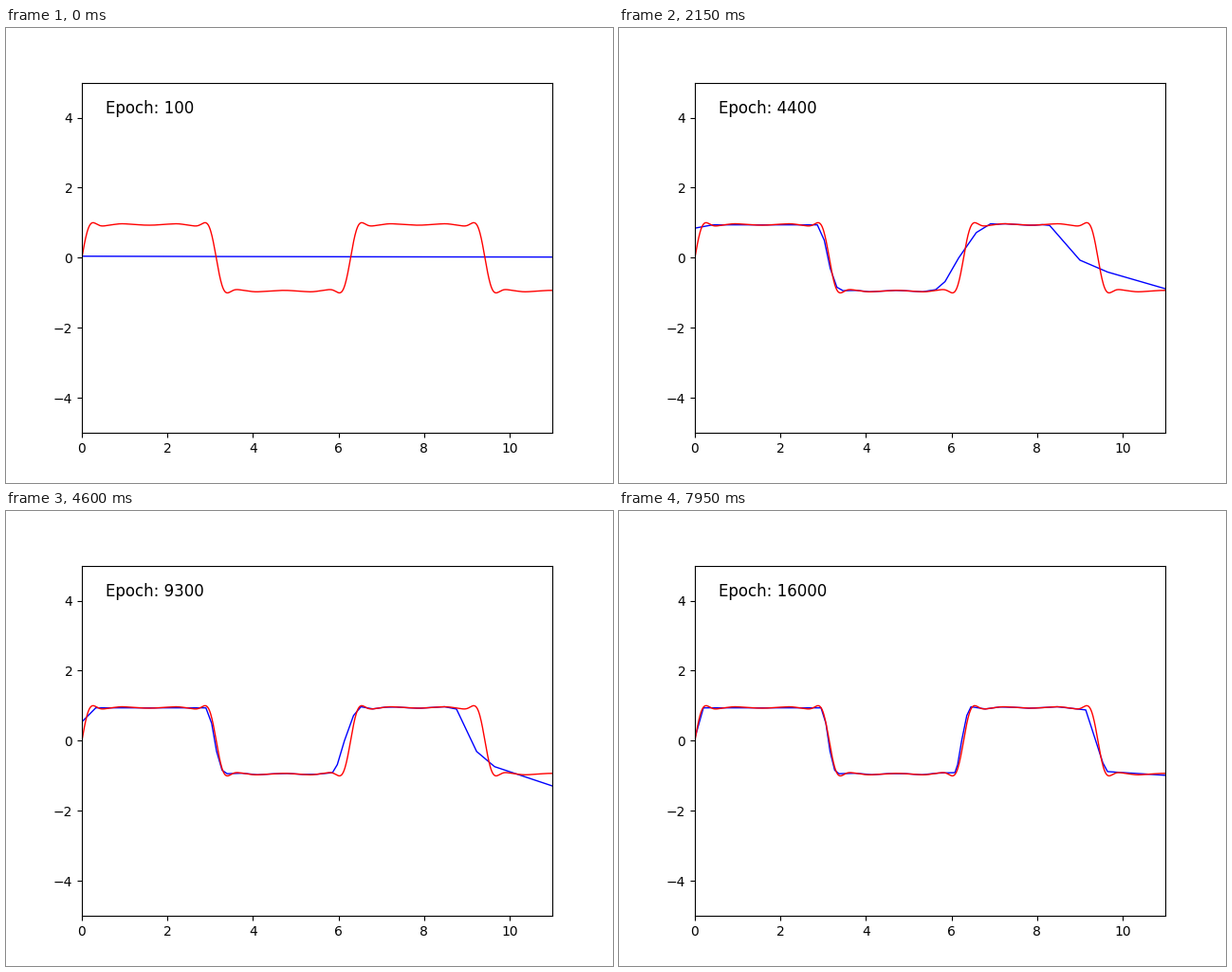
These frames come from a looping animation (640x480 px, 8 s). A matplotlib script:

```python
import numpy as np
import matplotlib.pyplot as plt
from matplotlib.animation import FuncAnimation

FRAMES, STEP_MS = 160, 50
X_MAX = 11
WARMUP = 25  # frames until the curve has spread over the whole axis


def smooth(u):
    u = np.clip(u, 0, 1)
    return u * u * (3 - 2 * u)


def quarter(x):
    """Rippled step on 0..pi/2 through its turning points."""
    turns = np.array([0.235, 0.47, 0.92, np.pi / 2])
    y = np.sin(np.pi / 2 * np.minimum(x / turns[0], 1))
    for a, b, dy in zip(turns, turns[1:], (-0.09, 0.06, -0.04)):
        y = y + dy * smooth((x - a) / (b - a))
    return y


# Odd harmonics of the rippled step make a smooth periodic wave.
HARMONICS = np.arange(1, 18, 2)
grid = (np.arange(2000) + 0.5) * np.pi / 4000
COEFFS = [2 * np.mean(quarter(grid) * np.sin(k * grid)) for k in HARMONICS]


def wave(x):
    return sum(c * np.sin(k * x) for c, k in zip(COEFFS, HARMONICS))


def edge(x0, x1, fractions, levels):
    return [(x0 + (x1 - x0) * f, y) for f, y in zip(fractions, levels)]


def plateau(x0, x1, count):
    """Knots on the wave strictly between two edges."""
    xs = np.linspace(x0, x1, count + 2)[1:-1]
    return list(zip(xs, wave(xs)))


rng = np.random.default_rng(4)
noise = rng.normal(0, 0.05, FRAMES)


def learned(frame):
    """Piecewise linear fit: the edges creep towards those of the wave."""
    p = max(0, (frame - WARMUP) / (FRAMES - 1 - WARMUP))
    ease = 1 - (1 - p) ** 2.2
    swing = np.sin(np.pi * p ** 0.8) ** 2

    fall0, fall1 = 2.85 + 0.1 * p, 3.5 - 0.13 * ease
    rise0, rise1 = 5.45 + 0.63 * p ** 0.62, 6.45 + 0.91 * np.exp(-5 * p)
    drop = 7.72 + 1.42 * p ** 0.45
    end = -0.64 - 0.345 * ease - 0.4 * swing + noise[frame] * swing

    knots = [(0, 0.94 - 0.86 * p ** 1.1), (0.45 - 0.25 * p, 0.94)]
    knots += edge(fall0, fall1, (0, 0.27, 0.5, 0.76, 1),
                  (0.94, 0.5, -0.3, -0.84, -0.94))
    knots += plateau(fall1, rise0, 6)
    knots += edge(rise0, rise1, (0, 0.17, 0.42, 0.74, 1),
                  (-0.91, -0.68, 0, 0.72, 0.97))
    knots += plateau(rise1, drop, 7)
    knots += [(drop, 0.93 - 0.05 * p), (8.92 + 0.62 * p, 0.02 - 0.65 * p),
              (9.65, -0.23 - 0.65 * ease), (X_MAX, end)]
    x, y = np.array(knots).T

    # At first the fit spreads from left to right over a nearly flat line.
    gain = smooth((frame - 1.5 * x) / 8)
    return x, gain * y + (1 - gain) * 0.045 * np.exp(-x / 14)


fig, ax = plt.subplots(figsize=(6.4, 4.8), dpi=100)
ax.set_xlim(0, X_MAX)
ax.set_ylim(-5, 5)
curve, = ax.plot([], [], color="blue", lw=1)
x = np.linspace(0, X_MAX, 1100)
ax.plot(x, wave(x), color="red", lw=1)
label = ax.text(0.05, 0.95, "", transform=ax.transAxes, fontsize=12, va="top")


def update(frame):
    curve.set_data(*learned(frame))
    label.set_text(f"Epoch: {100 * (frame + 1)}")
    return curve, label


anim = FuncAnimation(fig, update, frames=FRAMES, interval=STEP_MS,
                     repeat=True, repeat_delay=0)
plt.show()
```
